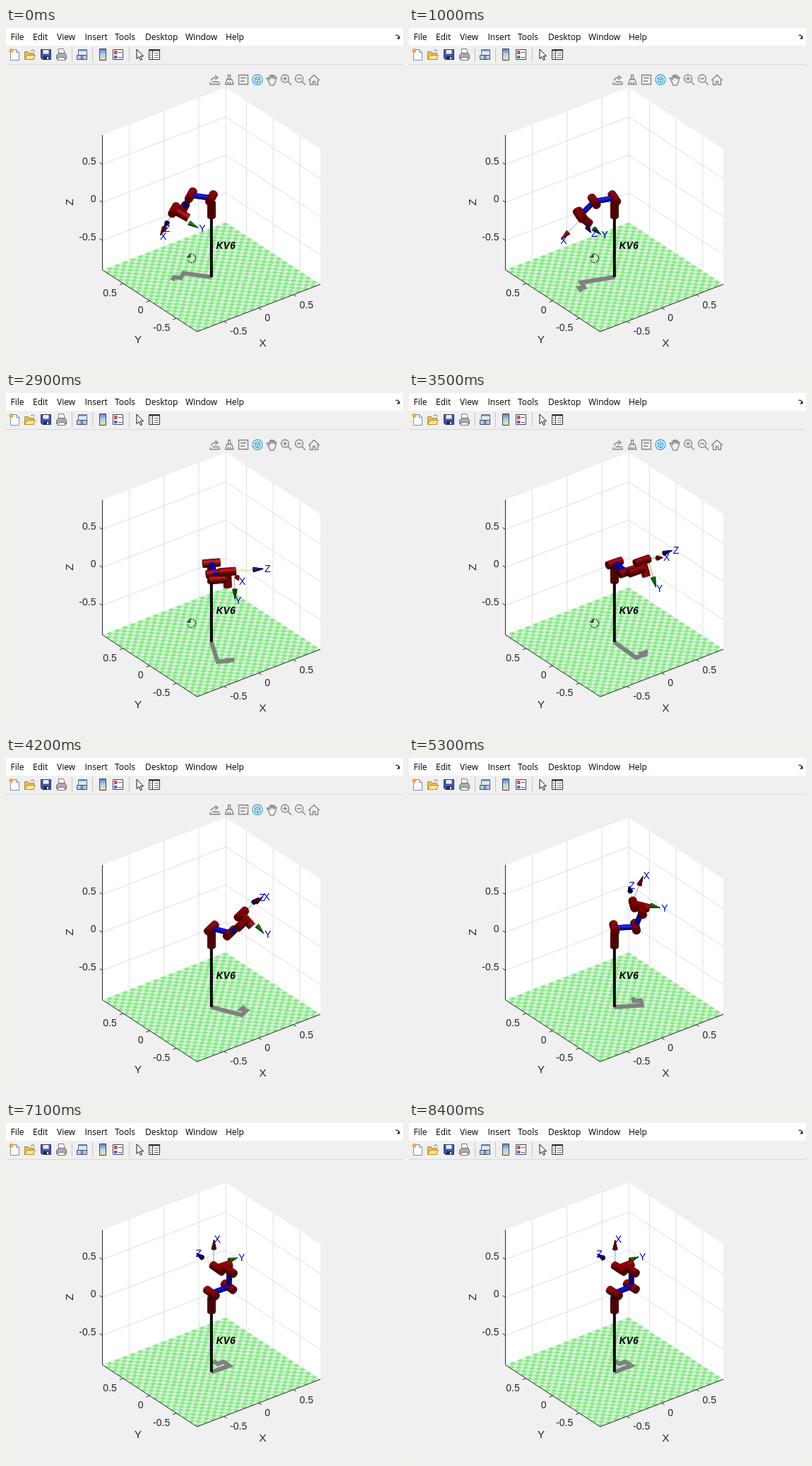
An HTML page with a canvas that plays this animation: 562x476 px, repeating every 9000 ms.

```html
<!DOCTYPE html>
<html lang="en">
<head>
<meta charset="utf-8">
<title>Robot arm plot</title>
<style>
html, body { margin: 0; width: 100%; height: 100%; overflow: hidden; background: #f0f0f0; }
svg, canvas { position: absolute; left: 0; top: 0; width: 562px; height: 476px; }
.menu { font: 12px "Open Sans", "Noto Sans", sans-serif; fill: #000; }
.tick { font: 14px "Liberation Sans", Arial, sans-serif; fill: #262626; }
.axis { font: 15.5px "Liberation Sans", Arial, sans-serif; fill: #262626; }
.name { font: italic bold 14px "Liberation Sans", Arial, sans-serif; }
.tool { font: 14px "Liberation Sans", Arial, sans-serif; fill: #0000cd; }
</style>
</head>
<body>
<svg viewBox="0 0 562 476">
  <rect width="562" height="25" fill="#fff"/>
  <path d="M0 51.5H562" stroke="#dadada"/>
  <g class="menu">
    <text x="6.5" y="17">File</text><text x="38" y="17">Edit</text>
    <text x="72" y="17">View</text><text x="111.500" y="17">Insert</text>
    <text x="154" y="17">Tools</text><text x="197" y="17">Desktop</text>
    <text x="254" y="17">Window</text><text x="311" y="17">Help</text>
  </g>
  <path d="M551.500 10.500c2-1 4 0 4.500 2.500" fill="none" stroke="#222" stroke-width="1.300"/>
  <path d="M557.500 11v4.500H553z" fill="#222"/>

  <path d="M93.500 27V48M122.500 27V48M174.500 27V48" stroke="#c4c4c4"/>
  <g stroke-width="1">
    <path d="M6.500 30.500H14.500L18.500 34.500V45.500H6.500z" fill="#fff" stroke="#6f8fb8"/>
    <path d="M14.500 30.500V34.500H18.500" fill="none" stroke="#6f8fb8"/>
    <circle cx="7.500" cy="32" r="3" fill="#f0a844"/>
    <path d="M26.500 44.500V33.500H31.500L33 35.500H39.500V44.500z" fill="#e9bd50" stroke="#b58a2c"/>
    <path d="M26.500 44.500L30 38.500H41.500L38.500 44.500z" fill="#ffe79a" stroke="#b58a2c"/>
    <path d="M35 32.500c3-3 5-1 5 1" fill="none" stroke="#4870a8"/>
    <path d="M49.500 30.500H63.500V44.500H51.500L49.500 42.500z" fill="#4355a5" stroke="#26336f"/>
    <path d="M52.500 31H60.500V36.500H52.500z" fill="#e8efff"/>
    <path d="M53 40H61V44H53z" fill="#222b4a"/><path d="M58 41H60V44H58z" fill="#fff"/>
    <path d="M74.500 36V29.500H81.500L83.500 36" fill="#fff" stroke="#777"/>
    <path d="M71.500 38.500L74.500 35.500H83.500L85.500 38.500V43.500H71.500z" fill="#a9adb5" stroke="#666"/>
    <path d="M74.500 41.500H82.500L84 45.500H73z" fill="#fff" stroke="#777"/>
    <path d="M102.500 30.500H114.500V39.500H102.500z" fill="#dfe9f6" stroke="#536d94"/>
    <path d="M102.500 31.500H114.500" stroke="#5a86c4" stroke-width="2"/>
    <path d="M100.500 38.500H108.500V44.500H100.500zM106.500 38.500H114.500V44.500H106.500z" fill="#b9c9e2" stroke="#3d506e"/>
    <path d="M132.500 29.500H141.500V45.500H132.500z" fill="url(#bar)" stroke="#444"/>
    <path d="M151.500 30.500H165.500V44.500H151.500z" fill="#fff" stroke="#445"/>
    <path d="M153 32H157.500V37H153z" fill="#d24a4a"/><path d="M153 39H157.500V43H153z" fill="#4a66d2"/>
    <path d="M159 34.500H164M159 41.500H164" stroke="#555"/>
    <path d="M185 30V43.500L188.200 40.500L190.500 45.500L192.500 44.500L190.300 39.800H194.500z" fill="#fff" stroke="#111"/>
    <path d="M202.500 30.500H217.500V44.500H202.500z" fill="#fff" stroke="#333"/>
    <path d="M202.500 31.500H217.500" stroke="#333" stroke-width="2"/>
    <path d="M207.500 31V44.500" stroke="#333"/>
    <path d="M204 35.500H206M204 38.500H206M204 41.500H206M210 35.500H216M210 38.500H216M210 41.500H216" stroke="#666"/>
  </g>
  <defs><linearGradient id="bar" x2="0" y2="1">
    <stop stop-color="#5b79d8"/><stop offset=".5" stop-color="#a9d8ee"/><stop offset="1" stop-color="#f2df96"/>
  </linearGradient></defs>

  <path id="walls" fill="#fff"/>
  <path id="grid" fill="none" stroke="#dedede"/>
  <path id="floor" fill="#dfecdf"/>
  <path id="tiles" fill="#82f082"/>
  <path id="frame" fill="none" stroke="#262626"/>
  <g class="tick" id="ticks"></g>
  <g class="axis" text-anchor="middle">
    <text x="363.500" y="449.500">X</text><text x="187" y="444.500">Y</text>
    <text transform="translate(95 246) rotate(-90)">Z</text>
  </g>
</svg>
<canvas id="scene" width="562" height="476"></canvas>
<svg viewBox="0 0 562 476">
  <text class="name" x="297.500" y="312">KV6</text>
  <g class="tool" id="labels"><text>X</text><text>Y</text><text>Z</text></g>
  <g id="hover" fill="none" stroke="#808080" stroke-width="1.300">
    <path d="M289 76.500V79.500H302V76.500M290 74c3-4 5-5 8-4M296 67l4 3-4 3M292 76h9"/>
    <path d="M314.500 66.500h3v6h-3zM312.500 72.500h7l2.500 7h-11.500zM314.500 79v-3M317.500 79v-3"/>
    <path d="M329.500 66.500h13v13h-13zM332 70.500h8M332 75h6"/>
    <g stroke="#3da5dc"><circle cx="356" cy="73" r="7"/><path d="M352.500 71l3.500-2 3.500 2v4.500l-3.500 2-3.500-2zM352.500 71l3.500 2 3.500-2M356 73v4.500"/></g>
    <path d="M371 74l-2-3 2-.5 2 2.500v-5l1.500-.5.8 4V66.500h1.700l.5 5 1-4.500 1.600.3-.2 5 1.500-3 1.500.5-1.400 6-2.500 5h-5z"/>
    <circle cx="395" cy="71.500" r="5.500"/><path d="M399 75.500l5 5M392 71.500h6M395 68.500v6"/>
    <circle cx="415" cy="71.500" r="5.500"/><path d="M419 75.500l5 5M412 71.500h6"/>
    <path d="M428 74l8-7.500 8 7.500M430.500 73v7h4v-4.500h3V80h4v-7"/>
  </g>
  <g id="pointer" fill="none" stroke="#111" stroke-width="1.300">
    <path d="M258 321.500a6 6 0 1 1-1 6" stroke-dasharray="2 1.300"/>
    <path d="M256 323.500h4.500v-4"/>
  </g>
</svg>
<script>
const $ = id => document.getElementById(id);
const ctx = $('scene').getContext('2d');
const SCALE = 123.9, R = 0.8884, RAD = Math.PI / 180;
const CA = Math.cos(37.5 * RAD), SA = Math.sin(37.5 * RAD), CE = Math.cos(30 * RAD), SE = 0.5;

const add = (a, b, k = 1) => a.map((v, i) => v + b[i] * k);
const dot = (a, b) => a[0] * b[0] + a[1] * b[1] + a[2] * b[2];
const cross = (a, b) => [a[1] * b[2] - a[2] * b[1], a[2] * b[0] - a[0] * b[2], a[0] * b[1] - a[1] * b[0]];
const unit = a => a.map(v => v / Math.hypot(...a));

const VIEW = [-SA * CE, -CA * CE, SE];
const LIGHT = unit([-0.2, -0.3, 0.93]);
const HALF = unit(add(VIEW, LIGHT));

// Orthographic view: azimuth -37.5, elevation 30
const project = ([x, y, z]) => [
  290.8 + SCALE * (CA * x - SA * y),
  256.5 - SCALE * (SE * (SA * x + CA * y) + CE * z)
];
const path = (...pts) => 'M' + pts.map(p => project(p).map(v => v.toFixed(2)).join(' ')).join('L');

function drawAxes() {
  const r = R, n = -R;
  $('walls').setAttribute('d', path([n, r, n], [n, r, r], [r, r, r], [r, n, r], [r, n, n], [r, r, n]) + 'Z');
  $('floor').setAttribute('d', path([n, n, n], [r, n, n], [r, r, n], [n, r, n]) + 'Z');
  let grid = path([r, r, n], [r, r, r]);
  let frame = path([r, n, n], [n, n, n], [n, r, n], [n, r, r]);
  let texts = '';
  const label = (p, dx, dy, anchor, s) => {
    const [x, y] = project(p);
    texts += `<text x="${x + dx}" y="${y + dy}" text-anchor="${anchor}">${s}</text>`;
  };
  for (const v of [-0.5, 0, 0.5]) {
    grid += path([v, r, n], [v, r, r]) + path([r, v, n], [r, v, r]) + path([n, r, v], [r, r, v], [r, n, v]);
    frame += path([v, n, n], [v, n - 0.05, n]) + path([n, v, n], [n - 0.05, v, n]) + path([n, r, v], [n, r + 0.05, v]);
    label([v, n, n], 8.5, 19, 'start', v);
    label([n, v, n], -9, 18, 'end', v);
    label([n, r, v], -9, 0, 'end', v);
  }
  $('grid').setAttribute('d', grid);
  $('frame').setAttribute('d', frame);
  $('ticks').innerHTML = texts;

  const count = 32, step = 2 * R / count;
  let tiles = '';
  for (let i = 0; i < count; i++) for (let j = i % 2; j < count; j += 2) {
    const x = n + i * step, y = n + j * step;
    tiles += path([x, y, n], [x + step, y, n], [x + step, y + step, n], [x, y + step, n]) + 'Z';
  }
  $('tiles').setAttribute('d', tiles);
}

let faces = [];

function face(pts, normal, color) {
  if (dot(normal, VIEW) <= 0) return;
  const mid = pts.reduce((s, p) => add(s, p, 1 / pts.length), [0, 0, 0]);
  const lit = 0.3 + 0.6 * Math.max(0, dot(normal, LIGHT));
  const shine = 45 * Math.max(0, dot(normal, HALF)) ** 14;
  const rgb = color.map(c => Math.min(255, Math.round(c * lit + shine)));
  faces.push({ pts, depth: dot(mid, VIEW), fill: `rgb(${rgb})` });
}

// Cylinder, or cone when r1 is 0, from point a to point b
function tube(a, b, r0, r1, color, parts = 4) {
  const span = add(b, a, -1), axis = unit(span), sides = 18;
  const u = unit(cross(axis, Math.abs(axis[2]) > 0.8 ? [1, 0, 0] : [0, 0, 1])), w = cross(axis, u);
  const dir = i => {
    const t = i * 2 * Math.PI / sides;
    return add(u.map(v => v * Math.cos(t)), w, Math.sin(t));
  };
  const at = (i, k) => add(add(a, span, k), dir(i), r0 + (r1 - r0) * k);
  const ring = [...Array(sides).keys()];
  for (const i of ring) for (let j = 0; j < parts; j++) {
    const k = j / parts, m = (j + 1) / parts;
    face([at(i, k), at(i + 1, k), at(i + 1, m), at(i, m)], dir(i + 0.5), color);
  }
  face(ring.map(i => at(i, 0)), axis.map(v => -v), color);
  if (r1) face(ring.map(i => at(i, 1)), axis, color);
}

function line(pts, color, width) {
  ctx.strokeStyle = color;
  ctx.lineWidth = width;
  ctx.beginPath();
  pts.forEach(p => ctx.lineTo(...project(p)));
  ctx.stroke();
}

function paintFaces() {
  faces.sort((p, q) => p.depth - q.depth);
  ctx.lineWidth = 0.6;
  for (const f of faces) {
    ctx.fillStyle = ctx.strokeStyle = f.fill;
    ctx.beginPath();
    f.pts.forEach(p => ctx.lineTo(...project(p)));
    ctx.closePath();
    ctx.fill();
    ctx.stroke();
  }
  faces = [];
}

const RED = [160, 0, 0], BLUE = [0, 0, 235], UP = [0, 0, 1];
const SHAFTS = ['#0072bd', '#d95319', '#edb120'];
const CONES = [[150, 0, 0], [0, 125, 0], [0, 0, 120]];
const LABELS = $('labels').children;

function draw(ms) {
  // Quintic joint trajectory, already under way at time zero
  const k = Math.min(1, (ms + 3200) / 11450);
  const s = k * k * k * (10 - 15 * k + 6 * k * k);
  const turn = (90 + 270 * s) * RAD, bend = (90 - 180 * s) * RAD;
  const out = [Math.cos(turn), Math.sin(turn), 0];
  const side = [-out[1], out[0], 0];
  const fore = add(out.map(v => v * Math.cos(bend)), UP, -Math.sin(bend));
  const hand = add(out.map(v => v * Math.sin(bend)), UP, Math.cos(bend));

  const moves = [[UP, 0.1519], [out, 0.24365], [fore, 0.21325], [side, 0.11235], [hand, 0.08535], [side, 0.0819]];
  const pts = [[0, 0, 0]];
  moves.forEach(([d, len], i) => pts.push(add(pts[i], d, len)));
  const tip = pts[6];

  ctx.clearRect(0, 0, 562, 476);
  ctx.lineJoin = 'miter';
  line(pts.map(p => [p[0], p[1], -R]), '#808080', 6);
  line([[0, 0, -R], [0, 0, 0]], '#000', 4);

  const axes = [fore, hand.map(v => -v), side];
  ctx.globalAlpha = 0.6;
  axes.forEach((d, i) => line([tip, add(tip, d, 0.24)], SHAFTS[i], 1));
  ctx.globalAlpha = 1;
  ctx.lineJoin = 'round';

  [UP, side, side, side, hand, side].forEach((d, i) => tube(add(pts[i], d, -0.098), add(pts[i], d, 0.098), 0.045, 0.045, RED));
  moves.forEach((m, i) => tube(pts[i], pts[i + 1], 0.028, 0.028, BLUE, 6));
  axes.forEach((d, i) => {
    tube(add(tip, d, 0.22), add(tip, d, 0.335), 0.027, 0, CONES[i], 2);
    const [x, y] = project(add(tip, d, 0.35));
    LABELS[i].setAttribute('x', x);
    LABELS[i].setAttribute('y', y + 5);
  });
  paintFaces();
  $('pointer').style.display = ms < 3600 ? '' : 'none';
  $('hover').style.display = ms < 4600 ? '' : 'none';
}

let last = -1;
function tick() {
  const ms = Math.min(8400, Math.floor(performance.now() % 9000 / 100) * 100);
  if (ms !== last) draw(last = ms);
  requestAnimationFrame(tick);
}
drawAxes();
tick();
</script>
</body>
</html>
```
